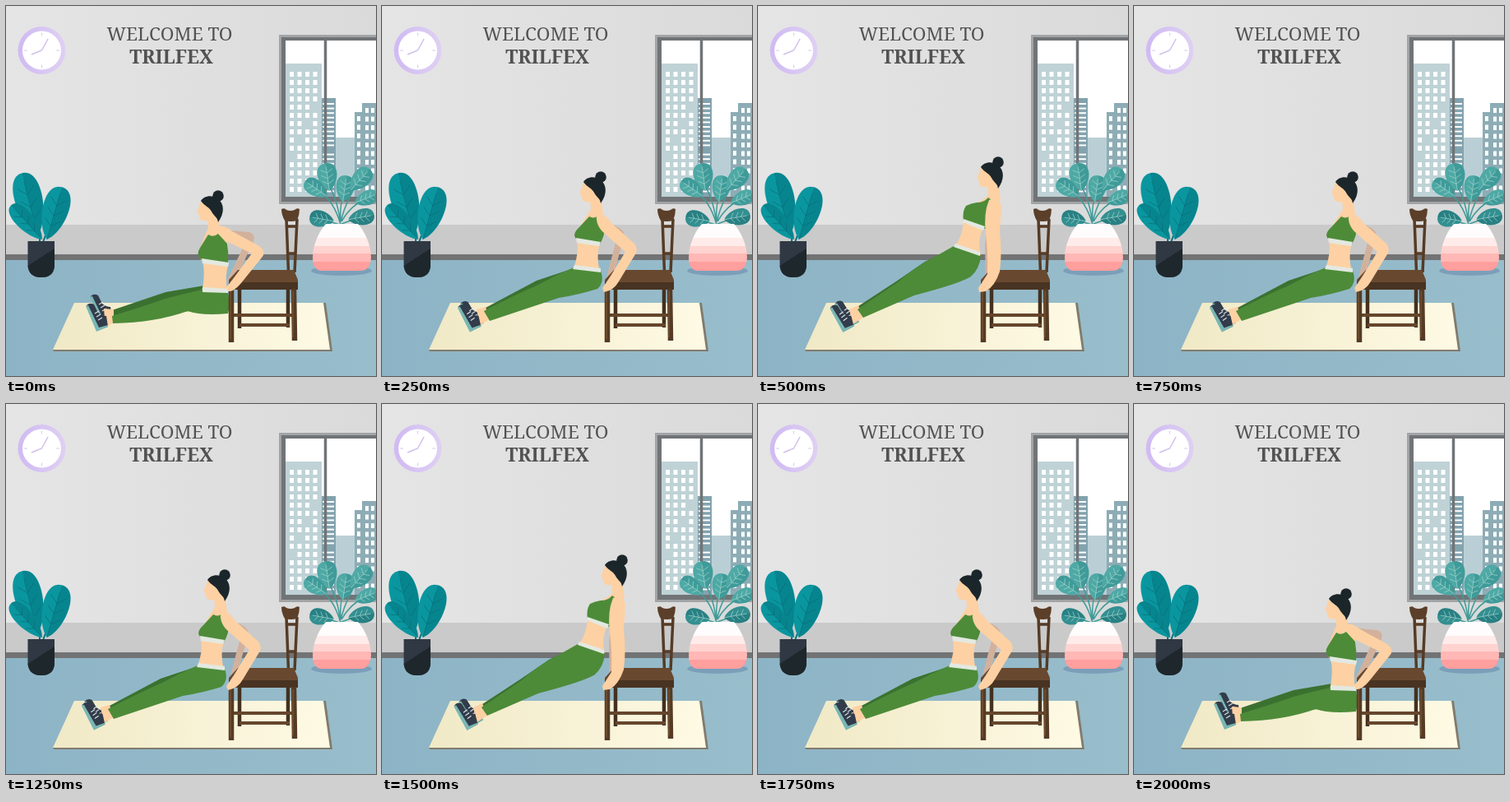
Recreate the animation shown at these times as an HTML page. Size 450 by 450 pixels, loop 2500 ms.

```html
<!DOCTYPE html>
<html lang="en">
<head>
<meta charset="utf-8">
<title>Chair dips</title>
<style>
  html, body { margin: 0; width: 100%; height: 100%; overflow: hidden; }
  svg { display: block; width: 100%; height: 100%; }
  text { font-family: "Noto Serif", serif; fill: #525252; text-anchor: middle; }
</style>
</head>
<body>
<svg viewBox="0 0 450 450">
  <defs>
    <linearGradient id="wall">
      <stop stop-color="#e5e5e5"/><stop offset="1" stop-color="#dadada"/>
    </linearGradient>
    <linearGradient id="floor">
      <stop stop-color="#8db4c6"/><stop offset="1" stop-color="#98bdcb"/>
    </linearGradient>
    <linearGradient id="mat">
      <stop stop-color="#f0e9c6"/><stop offset="1" stop-color="#fefae4"/>
    </linearGradient>
    <linearGradient id="ring">
      <stop stop-color="#cfbaf3"/><stop offset="1" stop-color="#dfd0f2"/>
    </linearGradient>
    <linearGradient id="leaf" x2="1" y2="0">
      <stop offset=".5" stop-color="#0a969f"/><stop offset=".5" stop-color="#06858f"/>
    </linearGradient>
    <linearGradient id="pale" x2="1" y2="0">
      <stop offset=".5" stop-color="#4ea9a5"/><stop offset=".5" stop-color="#3f9b99"/>
    </linearGradient>
    <linearGradient id="deep" x2="1" y2="0">
      <stop offset=".5" stop-color="#338f90"/><stop offset=".5" stop-color="#288083"/>
    </linearGradient>
    <clipPath id="pot"><path d="M389 265H428C437 275 444 291 444 306Q443 322 431 322H385Q373 322 373 306C373 291 380 275 389 265Z"/></clipPath>
  </defs>

  <!-- room -->
  <rect width="450" height="267" fill="url(#wall)"/>
  <rect y="266" width="450" height="37" fill="#cacaca"/>
  <rect y="302" width="450" height="7" fill="#727374"/>
  <rect y="309" width="450" height="141" fill="url(#floor)"/>
  <text x="199" y="41.500" font-size="22.500">WELCOME TO</text>
  <text x="201" y="70" font-size="23" font-weight="700">TRILFEX</text>

  <g id="clock">
    <circle cx="43.500" cy="54" r="29" fill="url(#ring)"/>
    <circle cx="43.500" cy="54" r="23.500" fill="#fff"/>
    <path d="M31 59L43.500 54L51 40" fill="none" stroke="#d0bfe9" stroke-width="1.500"/>
  </g>

  <g id="view">
    <rect x="332" y="35" width="118" height="206" fill="#a2a4a5"/>
    <rect x="335" y="38" width="115" height="200" fill="#717476"/>
    <rect x="340" y="42" width="110" height="190" fill="#fff"/>
    <path d="M340 232V70H384V232Z" fill="#bfd2d6"/>
    <path d="M384 232V112H401V232Z" fill="#83a3ae"/>
    <path d="M401 232V160H425V232Z" fill="#bacfd5"/>
    <path d="M424 232V129H433V118H450V232Z" fill="#8eacb5"/>
  </g>
  <path d="M388.500 40V235" stroke="#717476" stroke-width="3.500"/>

  <!-- plants -->
  <g id="plantL">
    <path d="M41 290V262M44 290L55 260" stroke="#06717c" stroke-width="2"/>
  </g>
  <path d="M26.500 286H59V316Q58 330 43 330T26.500 316Z" fill="#2f3843"/>
  <path d="M59 295V316Q58 330 43 330T26.500 316Z" fill="#1e272b"/>
  <ellipse cx="408" cy="322" rx="37" ry="6" fill="#7c9fb9"/>
  <g id="plantR">
    <path d="M407 268Q404 235 391 216M407 266Q398 234 378 224M407 262Q405 240 413 224M407 262Q415 232 430 213M408 262Q419 243 436 235M408 265L430 257M406 266L386 260" fill="none" stroke="#3f9b99" stroke-width="1.500"/>
  </g>
  <g clip-path="url(#pot)">
    <path d="M370 260H446V282H370Z" fill="#fefcfc"/>
    <path d="M370 282H446V293H370Z" fill="#ffebe9"/>
    <path d="M370 292H446V302H370Z" fill="#ffd3d0"/>
    <path d="M370 301H446V312H370Z" fill="#ffb8b5"/>
    <path d="M370 311H446V323H370Z" fill="#ff9f9e"/>
  </g>

  <path d="M384 361H389L397 420H58L57 418H393Z" fill="#817b6e"/>
  <path d="M83 361H386L394 418H57Z" fill="url(#mat)"/>

  <g id="back"></g>
  <g id="chair" fill="none" stroke="#553b26">
    <path d="M284 340V392M343 340V391" stroke="#443020" stroke-width="4.500"/>
    <path d="M277 376H348M284 388H345" stroke="#65462c" stroke-width="4"/>
    <path d="M341 259L343.500 324M354 259L351 324" stroke-width="3.500"/>
    <path d="M342 268H353M343 301H352" stroke-width="3.500"/>
    <path d="M335 247Q339 245 341 248Q346 250 351 248Q354 245 357 247Q357 254 354 261Q346 263 339 261Q335 254 335 247Z" fill="#5b3f29" stroke="none"/>
    <path d="M282 321H350L355 333V340H271V333Z" fill="#684930" stroke="none"/>
    <path d="M271 336H355V345H271Z" fill="#493322" stroke="none"/>
    <path d="M274 344V409M350 344L351 407" stroke-width="6.500"/>
    <path d="M273 347V405M349 347V403" stroke="#74512f" stroke-width="1.500"/>
  </g>
  <g id="front"></g>
</svg>

<script>
const $ = id => document.getElementById(id);
const add = (id, markup) => $(id).insertAdjacentHTML('beforeend', markup);
const path = (d, fill) => `<path d="${d}" fill="${fill}"/>`;
const SKIN = '#fdd1a3', SHADE = '#d2b19c', GREEN = '#4d8b39', DARK = '#3b7130',
      TRIM = '#e3e9e1', HAIR = '#1b262b', SHOE = '#323c4a';

for (let i = 0; i < 4; i++)
  add('clock', `<path d="M43.500 32.500v4" stroke="#d8caee" transform="rotate(${i * 90} 43.500 54)"/>`);

function panes(x, y, cols, rows, dx, dy, w, h) {
  for (let r = 0; r < rows; r++)
    for (let c = 0; c < cols; c++)
      if ((r * 7 + c * 3) % 11 != 4)
        add('view', `<rect x="${x + c * dx}" y="${y + r * dy}" width="${w}" height="${h}" fill="#fff"/>`);
}
panes(345, 80, 4, 15, 9.5, 10, 5, 6);
panes(385, 118, 1, 20, 6, 5.6, 14, 2);
panes(437, 124, 2, 10, 7, 10.5, 4, 6);
panes(427, 134, 1, 9, 7, 10.5, 4, 6);

// Leaf with its base at the bottom, tilted about its centre.
function leaf(id, x, y, rx, ry, tilt, fill, vein) {
  let veins = `M0 ${ry}V${-ry * .75}`;
  for (let k = -.3; k < .8; k += .4)
    veins += `M${-rx * .6} ${ry * (k - .25)}L0 ${ry * k}L${rx * .6} ${ry * (k - .25)}`;
  add(id, `<g transform="translate(${x} ${y}) rotate(${tilt})">
    <path d="M0 ${ry}C${-rx * 1.1} ${ry * .6} ${-rx * 1.55} ${-ry} 0 ${-ry}C${rx * 1.55} ${-ry} ${rx * 1.1} ${ry * .6} 0 ${ry}Z" fill="url(#${fill})"/>
    <path d="${veins}" fill="none" stroke="${vein}" stroke-width=".7"/></g>`);
}
leaf('plantL', 29, 241, 17, 39, -14, 'leaf', '#0a6f7a');
leaf('plantL', 59, 252, 16, 33, 16, 'leaf', '#0a6f7a');
leaf('plantL', 25, 263, 11, 28, -42, 'leaf', '#0a6f7a');
for (const [x, y, rx, ry, tilt, fill] of [
  [391, 208, 12, 17, -8, 'pale'], [377, 222, 10, 16, -55, 'pale'], [412, 222, 11, 16, 8, 'pale'],
  [431, 211, 11, 17, 42, 'pale'], [438, 234, 9, 15, 68, 'pale'],
  [432, 257, 10, 16, 80, 'deep'], [384, 259, 10, 15, -80, 'deep']
]) leaf('plantR', x, y, rx, ry, tilt, fill, '#9ed2cc');

const head =
  path('M238 236C235 242 235 246 232 250L234 252L236 259Q238 262 245 261L247 276H261L258 254L254 238Z', SKIN) +
  path('M237 237C240 231 250 229 257 234C266 240 266 252 258 263C257 256 253 256 250 250C247 244 242 244 237 237Z', HAIR) +
  `<circle cx="258" cy="231" r="6.800" fill="${HAIR}"/>`;

const shoe = path('M98 364Q102 360 107 363L112 373Q117 377 122 377L124 390L111 395Z', SHOE) +
  path('M97 365L100 364L113 391L124 388V390L110 396Z', '#79b7b4') +
  '<path d="M108 374L113 371M110 378L115 375M112 382L117 379" stroke="#d9e0e6" stroke-width="1.200"/>';

// head and shoes: [dx, dy]; shoes also carry a tilt
const poses = [
  {
    head: [0, 0], near: [0, 0, 0], far: [5, -11, 0],
    farArm: 'M260 272L296 275Q304 278 301 286L281 329L268 336L290 290L264 285Z',
    ankle: 'M119 368L131 369V385L123 390L120 380Z',
    farLeg: 'M241 340L194 348L129 370L131 380L200 373L262 368Z',
    leg: 'M239 345L270 348Q273 366 270 374Q238 377 221 371Q182 385 130 386L129 377Q165 366 194 356Q220 349 239 345Z',
    belly: 'M239 309L271 313Q265 329 270 348L238 348Q243 326 239 309Z',
    band: 'M239 342L270 344V349L239 348Z',
    chest: 'M247 267L260 268L270 288L268 314L238 310Q231 302 236 294Z',
    bra: 'M246 278Q252 282 258 277L269 289Q271 301 270 313L238 309Q230 303 236 294Z',
    hem: 'M238 307L271 312L270 317L239 313Z',
    arm: 'M256 268Q266 266 275 274L308 292Q317 299 311 306L286 337Q277 348 270 347L268 342L276 332L299 301L270 287Q260 280 256 268Z'
  },
  {
    head: [8, -23], near: [-4, 0, -4], far: [-1, -4, -4],
    farArm: 'M266 259L289 270Q296 275 294 282L283 322L272 334L284 288Z',
    ankle: 'M115 369L126 366L131 381L119 388Z',
    farLeg: 'M236 318L188 334L124 368L130 380L210 354L260 340Z',
    leg: 'M233 318L266 322Q271 336 262 344Q240 351 215 355L131 383L124 371Q160 352 190 339Q212 327 233 318Z',
    belly: 'M237 284L265 288Q260 305 265 323L233 319Q240 300 237 284Z',
    band: 'M234 315L266 319V324L232 320Z',
    chest: 'M254 247L267 248L274 270L264 291L237 286Q231 278 240 270Z',
    bra: 'M252 256Q259 260 264 253L272 266Q271 279 265 290L237 284Q230 278 240 269Z',
    hem: 'M236 282L266 287L264 292L237 288Z',
    arm: 'M261 252Q272 252 279 264L307 289Q312 296 308 302L288 335Q282 346 270 348L268 343L277 330L296 299L271 277Q259 267 261 252Z'
  },
  {
    head: [34, -41], near: [-8, 0, -6], far: [-2, -5, -6],
    farArm: 'M282 246L291 250L287 310L277 334L276 290Z',
    ankle: 'M111 369L122 364L128 379L115 387Z',
    farLeg: 'M241 293L203 311L168 335L119 367L126 379L200 345Z',
    leg: 'M238 292L271 303Q270 319 259 329Q247 337 190 352L128 379L121 369Q149 350 170 336Q190 318 208 309Z',
    belly: 'M250 260L275 269Q266 282 271 304L239 293Q249 280 250 260Z',
    band: 'M240 289L270 299L270 304L238 293Z',
    chest: 'M281 230L294 231L292 262L274 272L250 262L256 243L271 237Z',
    bra: 'M266 239Q275 239 280 233L290 240L291 264L275 271L250 262Q248 250 253 243Q259 240 266 239Z',
    hem: 'M250 259L276 268L274 273L249 263Z',
    arm: 'M281 236Q293 231 296 244L294 275Q297 300 294 323Q288 341 277 347L269 348L268 343L279 326Q280 302 277 277Q274 252 281 236Z'
  }
].map(p => {
  const foot = ([x, y, tilt]) => `<g transform="translate(${x} ${y}) rotate(${tilt} 120 384)">${shoe}</g>`;
  return {
    back: path(p.farArm, SHADE) + foot(p.far) + path(p.farLeg, DARK) + path(p.ankle, SKIN) + foot(p.near) +
      path(p.belly, SKIN) + path(p.leg, GREEN) + path(p.band, TRIM) +
      `<g transform="translate(${p.head})">${head}</g>` +
      path(p.chest, SKIN) + path(p.bra, GREEN) + path(p.hem, TRIM),
    front: path(p.arm, SKIN)
  };
});

// One pose per 250 ms: down, half, up, half, twice over, then a rest.
const order = [0, 1, 2, 1, 0, 1, 2, 1, 0, 0];
let shown = -1;
function draw() {
  const n = order[Math.floor(performance.now() % 2500 / 250)];
  if (n != shown) {
    $('back').innerHTML = poses[n].back;
    $('front').innerHTML = poses[n].front;
    shown = n;
  }
  requestAnimationFrame(draw);
}
draw();
</script>
</body>
</html>
```
